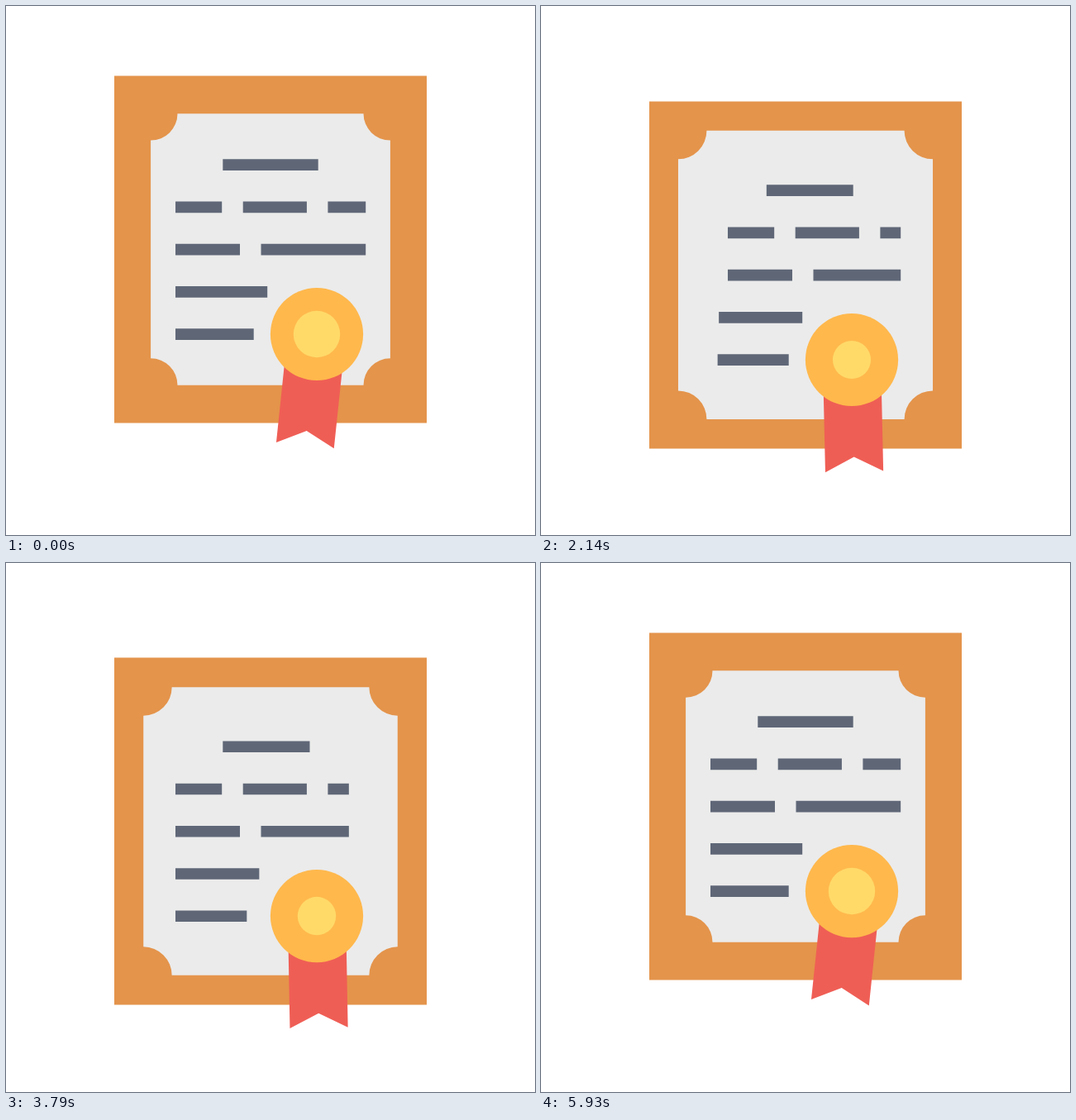
Animation of 640x640 px, one loop 6 s. Source, as an HTML page:

```html
<!DOCTYPE html>
<html lang="en">
<head>
<meta charset="utf-8">
<title>Certificate</title>
<style>
  html, body { margin: 0; width: 100%; height: 100%; overflow: hidden; background: #fff; }
  svg { display: block; width: 100%; height: 100%; }
</style>
</head>
<body>
<svg viewBox="0 0 640 640">
  <g id="card">
    <path fill="#e4944b" d="M131 84.4h378v420H131z"/>
    <!-- paper, centred on its own origin, with notched corners -->
    <path id="paper" fill="#ebebeb" d="M-112.5 -164.2H112.5A32.4 32.4 0 0 0 144.9 -131.8V131.8A32.4 32.4 0 0 0 112.5 164.2H-112.5A32.4 32.4 0 0 0 -144.9 131.8V-131.8A32.4 32.4 0 0 0 -112.5 -164.2z"/>
    <g id="rows" stroke="#5f6777" stroke-width="13.6"></g>
    <g transform="translate(376 397)">
      <path id="ribbon" fill="#ef5e55" d="M-35.1 0H35.1V135.4L0 117.6L-35.1 135.4z"/>
      <circle r="56.1" fill="#ffb84c"/>
      <circle id="core" r="28.2" fill="#ffda69"/>
    </g>
  </g>
</svg>
<script>
  const HALF = 1500, LOOP = 6000, LEAD = 27;
  const $ = id => document.getElementById(id);
  const card = $('card'), paper = $('paper'), ribbon = $('ribbon'), core = $('core');

  // left, right, dash pattern
  const rows = [
    [262.3, 377.7, 'none'],
    [205, 435.2, '56.2 25.5 77.2 25.5 60'],
    [205, 435.2, '78 25.5 140'],
    [205, 316.2, 'none'],
    [205, 299.7, 'none']
  ].map(([left, right, dash], i) => {
    const el = document.createElementNS('http://www.w3.org/2000/svg', 'line');
    const y = 192.1 + i * 51.25;
    el.setAttribute('y1', y);
    el.setAttribute('y2', y);
    el.setAttribute('stroke-dasharray', dash);
    $('rows').append(el);
    return { el, left, right };
  });

  // cubic-bezier(.5, 0, .5, 1)
  function ease(x) {
    let lo = 0, hi = 1;
    for (let i = 0; i < 24; i++) {
      const s = (lo + hi) / 2;
      if (1.5 * s * (1 - s) + s ** 3 < x) lo = s; else hi = s;
    }
    return lo * lo * (3 - 2 * lo);
  }

  function draw(now) {
    const t = (now + LEAD) % LOOP;
    const phase = t / HALF % 2;
    const p = ease(phase < 1 ? phase : 2 - phase);

    card.setAttribute('transform', `translate(0 ${51 * p})`);
    paper.setAttribute('transform', `translate(320 294.4) scale(${1 + 0.1035 * p})`);
    ribbon.setAttribute('transform', `rotate(${6 - 12 * p})`);
    core.setAttribute('r', 28.2 * (1 - 0.3 * p));

    // rows are trimmed at their start, then at their end
    const trimStart = t < LOOP / 2;
    for (const { el, left, right } of rows) {
      const cut = 0.15 * p * (right - left);
      el.setAttribute('x1', trimStart ? left + cut : left);
      el.setAttribute('x2', trimStart ? right : right - cut);
    }
  }

  const start = performance.now();
  function tick() {
    draw(performance.now() - start);
    requestAnimationFrame(tick);
  }
  tick();
</script>
</body>
</html>
```
